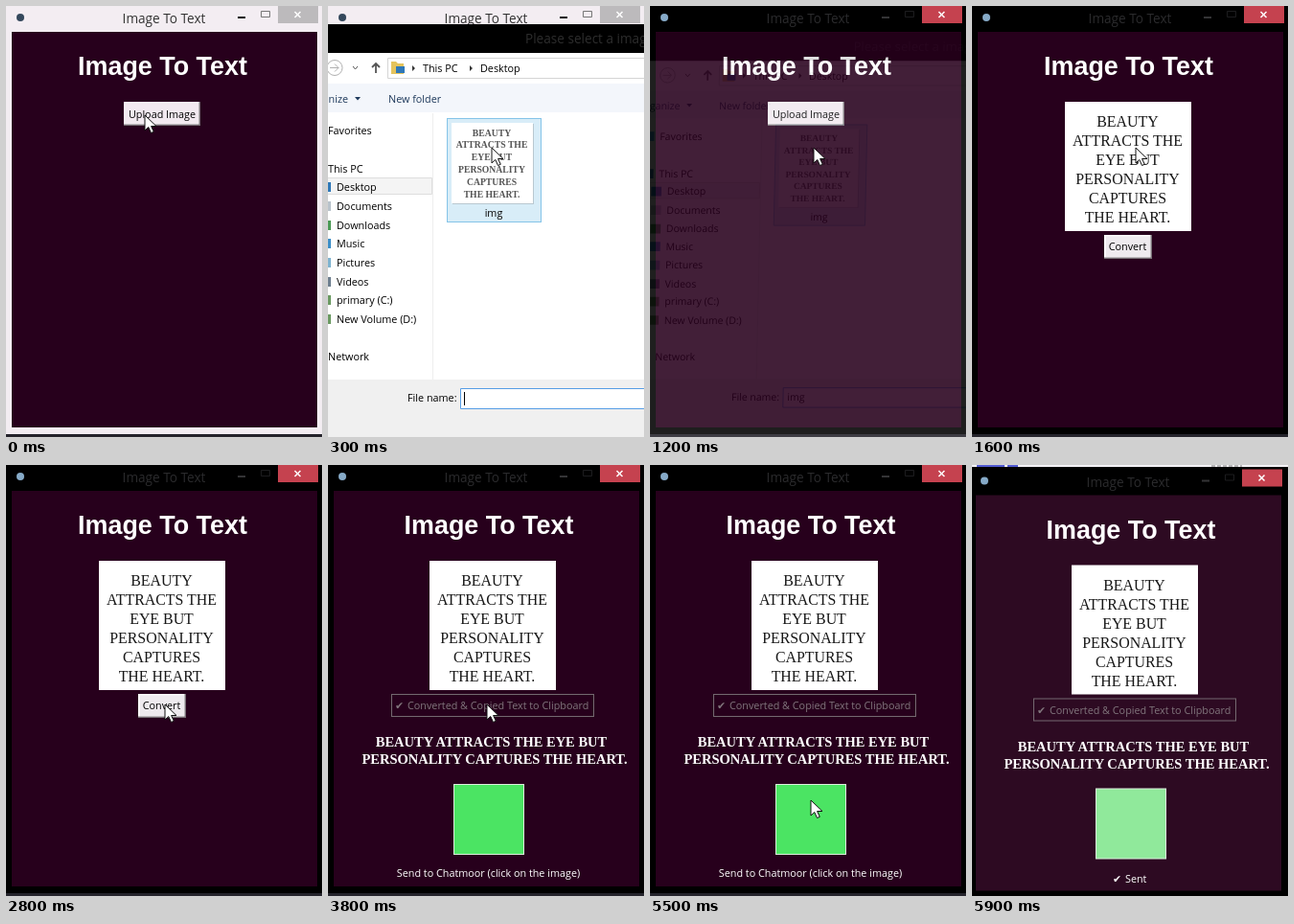
Write an HTML page that moves like this. It is 330x450 px and loops after 6900 ms.

```html
<!DOCTYPE html>
<html lang="en">
<head>
<meta charset="utf-8">
<title>Image To Text</title>
<style>
  html, body { margin: 0; width: 100%; height: 100%; overflow: hidden; background: #000; }
  svg { display: block; width: 330px; height: 450px;
    font: 10.8px "Open Sans", "Noto Sans", sans-serif;
    --frame: #000; --caption: #2b2b2d; --minimize: #343436; --maximize: #1d1d1f;
    --close: #c5424f; --icon: #86aac8; --body: #27001c; --send: #4be463; }
  svg.inactive { --frame: #f3edf2; --caption: #333; --minimize: #111; --maximize: #777;
    --close: #bcbabc; --icon: #34485c; }
  svg.sent { --body: #2d0a22; --send: #90e99b; }
  .caption { font-size: 13.6px; }
  .heading { font: bold 26.9px "Liberation Sans", Arial, sans-serif; }
  .quote { font: 15.9px "Liberation Serif", serif; }
  .thumb { font: bold 9.7px "Liberation Serif", serif; }
  .result { font: bold 14.5px "Liberation Serif", serif; }
  .check { font-family: "DejaVu Sans", sans-serif; font-weight: bold; }
  .mid { text-anchor: middle; }
  .nav { fill: #1e395b; }
</style>
</head>
<body>
<svg id="stage" viewBox="0 0 330 450">
  <rect width="330" height="450"/>

  <g id="app">
    <rect width="330" height="447" fill="var(--frame)"/>
    <rect y="447" width="332" height="3" fill="#24232b"/>
    <rect x="6" y="27" width="319" height="413" fill="var(--body)"/>
    <circle cx="15" cy="12" r="4" fill="var(--icon)"/>
    <text class="caption mid" x="165" y="18" fill="var(--caption)">Image To Text</text>
    <path d="M242 12h8" stroke="var(--minimize)" stroke-width="2"/>
    <path d="M266.500 5.500h9v6h-9z" fill="none" stroke="var(--maximize)"/>
    <rect x="284" width="42" height="18" fill="var(--close)"/>
    <path d="M301.500 6l6 6m0-6l-6 6" stroke="#fff" stroke-width="1.500"/>

    <text id="heading" class="heading mid" x="163.500" y="72" fill="#fff">Image To Text</text>

    <g id="upload">
      <rect x="123" y="100" width="80" height="25" fill="#776f75"/>
      <rect x="123" y="100" width="78.500" height="23.500" fill="#fff"/>
      <rect x="124.500" y="101.500" width="76.500" height="21.500" fill="#f2eaf0"/>
      <text class="mid" x="163" y="116.500">Upload Image</text>
    </g>

    <g id="picture">
      <rect x="97" y="100" width="132" height="135" fill="#fff"/>
      <g id="quote" class="quote mid" fill="#181818"></g>
    </g>

    <g id="convert">
      <rect x="138" y="239" width="50" height="25" fill="#776f75"/>
      <rect x="138" y="239" width="48.500" height="23.500" fill="#fff"/>
      <rect x="139.500" y="240.500" width="46.500" height="21.500" fill="#eeeaee"/>
      <text class="mid" x="162.500" y="255">Convert</text>
    </g>

    <g id="output" fill="#fff">
      <rect x="66.500" y="239.500" width="211" height="23" fill="none" stroke="#746970"/>
      <g fill="#80757c">
        <text class="check" x="70" y="255">✔</text>
        <text x="83" y="255">Converted &amp; Copied Text to Clipboard</text>
      </g>
      <g class="result mid">
        <text x="170.500" y="294">BEAUTY ATTRACTS THE EYE BUT</text>
        <text x="174" y="312">PERSONALITY CAPTURES THE HEART.</text>
      </g>
      <rect x="131" y="333" width="74" height="74" fill="#ddeedd"/>
      <rect x="132" y="334" width="72" height="72" fill="var(--send)"/>
      <text id="prompt" class="mid" x="167.500" y="430">Send to Chatmoor (click on the image)</text>
      <g id="confirmation">
        <text class="check" x="149" y="431">✔</text>
        <text x="162" y="431">Sent</text>
      </g>
    </g>
  </g>

  <g id="desktopEdge">
    <rect width="330" height="2" fill="#f4f2f6"/>
    <path d="M5 1h29m3 0h11" stroke="#525bd2" stroke-width="2"/>
    <path d="M250 1h32" stroke="#777" stroke-dasharray="4 2"/>
  </g>

  <g id="dialog">
    <rect x="-30" y="19" width="400" height="30"/>
    <text x="206" y="38.500" class="caption" fill="#2d2d2d">Please select a image</text>
    <rect x="-30" y="49" width="400" height="440" fill="#fff"/>
    <rect x="-30" y="81" width="400" height="30" fill="#f3f6fb"/>
    <rect x="-30" y="390" width="400" height="97" fill="#f0f0f0"/>

    <g fill="none" stroke="#b0b0b0">
      <circle cx="7" cy="64.500" r="8"/>
      <path d="M2 64.500h9m-4-4l4 4-4 4"/>
      <path d="M26 63l2.500 3 2.500-3" stroke="#555"/>
      <path d="M50 70v-10m-4 4l4-4 4 4" stroke="#555" stroke-width="1.800"/>
      <path d="M62.500 54.500H370v21H62.500z" stroke="#d5d5d5"/>
      <path d="M109.500 112v278" stroke="#eee"/>
    </g>
    <path d="M66 58h5l2 2h6v11H66z" fill="#e5c45d"/>
    <path d="M71 63h9v7h-9z" fill="#2f78b8"/>
    <path d="M88 62l3 3-3 3zM148 62l3 3-3 3z" fill="#333"/>
    <text x="99" y="69">This PC</text>
    <text x="159" y="69">Desktop</text>
    <g class="nav">
      <text x="21" y="101" text-anchor="end">Organize</text>
      <path d="M28 95h6l-3 3.500z"/>
      <text x="63" y="101">New folder</text>
    </g>

    <path d="M-30 179.500H108.500v17H-30z" fill="#f4f4f4" stroke="#dedede"/>
    <g id="sidebar"></g>

    <rect x="124.500" y="117.500" width="98" height="108" fill="#d8edf8" stroke="#85c4e8"/>
    <rect x="130" y="123" width="85" height="84" fill="#b9c8d0"/>
    <rect x="129" y="122" width="85" height="84" fill="#fff"/>
    <g id="thumb" class="thumb mid" fill="#555"></g>
    <text class="mid" x="173" y="220">img</text>

    <text x="83" y="413">File name:</text>
    <path d="M138.500 399.500H370v21H138.500z" fill="#fff" stroke="#569de5"/>
    <path id="caret" d="M142.500 403v14" stroke="#000"/>
    <text id="fileName" x="143" y="413">img</text>
  </g>

  <path id="cursor" d="M0 0V16l3.800-3.500 2.700 6 2.800-1.200-2.700-5.800H12z" fill="#fff" stroke="#111"/>
</svg>

<script>
const LOOP = 6900, STEP = 100;
const $ = id => document.getElementById(id);
const show = (id, on) => { $(id).style.display = on ? "" : "none"; };

function add(parent, tag, attributes, content = "") {
  const node = document.createElementNS("http://www.w3.org/2000/svg", tag);
  for (const key in attributes) node.setAttribute(key, attributes[key]);
  node.textContent = content;
  $(parent).append(node);
}

const lines = ["BEAUTY", "ATTRACTS THE", "EYE BUT", "PERSONALITY", "CAPTURES", "THE HEART."];
lines.forEach((line, i) => {
  add("quote", "text", { x: 162.5, y: 126 + i * 20 }, line);
  add("thumb", "text", { x: 171, y: 135.5 + i * 12.8 }, line);
});

// label, baseline, indent, icon colour
const places = [
  ["Favorites", 134, 0, "#4aa3dc"], ["This PC", 174, 0, "#3f7fb5"],
  ["Desktop", 193, 9, "#2f78b8"], ["Documents", 213, 9, "#b9c3cc"],
  ["Downloads", 233, 9, "#4b9a55"], ["Music", 252, 9, "#3d8fc9"],
  ["Pictures", 272, 9, "#7fb3d0"], ["Videos", 292, 9, "#6f7f90"],
  ["primary (C:)", 311, 9, "#6b9a62"], ["New Volume (D:)", 331, 9, "#6b9a62"],
  ["Network", 370, 0, "#3f7fb5"]
];
for (const [label, y, x, fill] of places) {
  add("sidebar", "rect", { x: x - 17, y: y - 9, width: 11, height: 10, fill });
  add("sidebar", "text", { x, y }, label);
}

// time, x, y
const cursorPath = [
  [0, 145, 114], [200, 145, 114], [300, 171, 148], [1700, 171, 148],
  [2300, 166, 250], [3900, 166, 250], [4600, 168, 350], [LOOP, 168, 350]
];

function cursorAt(t) {
  const next = cursorPath.findIndex(point => point[0] > t);
  const [t0, x0, y0] = cursorPath[next - 1];
  const [t1, x1, y1] = cursorPath[next];
  const p = (t - t0) / (t1 - t0), ease = p * p * (3 - 2 * p);
  return [x0 + (x1 - x0) * ease, y0 + (y1 - y0) * ease];
}

function dialogOpacity(t) {
  if (t < 100 || t >= 1300) return 0;
  if (t < 300) return 0.5;
  if (t < 1100) return 1;
  return t < 1200 ? 0.36 : 0.12;
}

function draw(t) {
  const loaded = t >= 1400, converted = t >= 3300, sent = t >= 5900;
  const inactive = t < 1100, settled = t >= 300 && inactive;

  $("stage").setAttribute("class", inactive ? "inactive" : sent ? "sent" : "");
  $("app").setAttribute("transform", sent ? "translate(-2 4.5)" : "");
  $("heading").setAttribute("x", converted ? 168 : 163.5);
  $("picture").setAttribute("transform", converted ? "translate(9 0)" : "");

  show("upload", !loaded);
  show("picture", loaded);
  show("convert", loaded && !converted);
  show("output", converted);
  show("prompt", !sent);
  show("confirmation", sent);
  show("desktopEdge", sent);

  $("dialog").setAttribute("opacity", dialogOpacity(t));
  $("dialog").setAttribute("transform", settled ? "" : "matrix(.972 0 -.021 .974 13 9.5)");
  show("caret", inactive);
  show("fileName", !inactive);

  show("cursor", !sent);
  $("cursor").setAttribute("transform", `translate(${cursorAt(t)})`);
}

const start = performance.now();
function frame() {
  const elapsed = (performance.now() - start) % LOOP;
  draw(Math.floor(elapsed / STEP) * STEP);
  requestAnimationFrame(frame);
}
frame();
</script>
</body>
</html>
```
